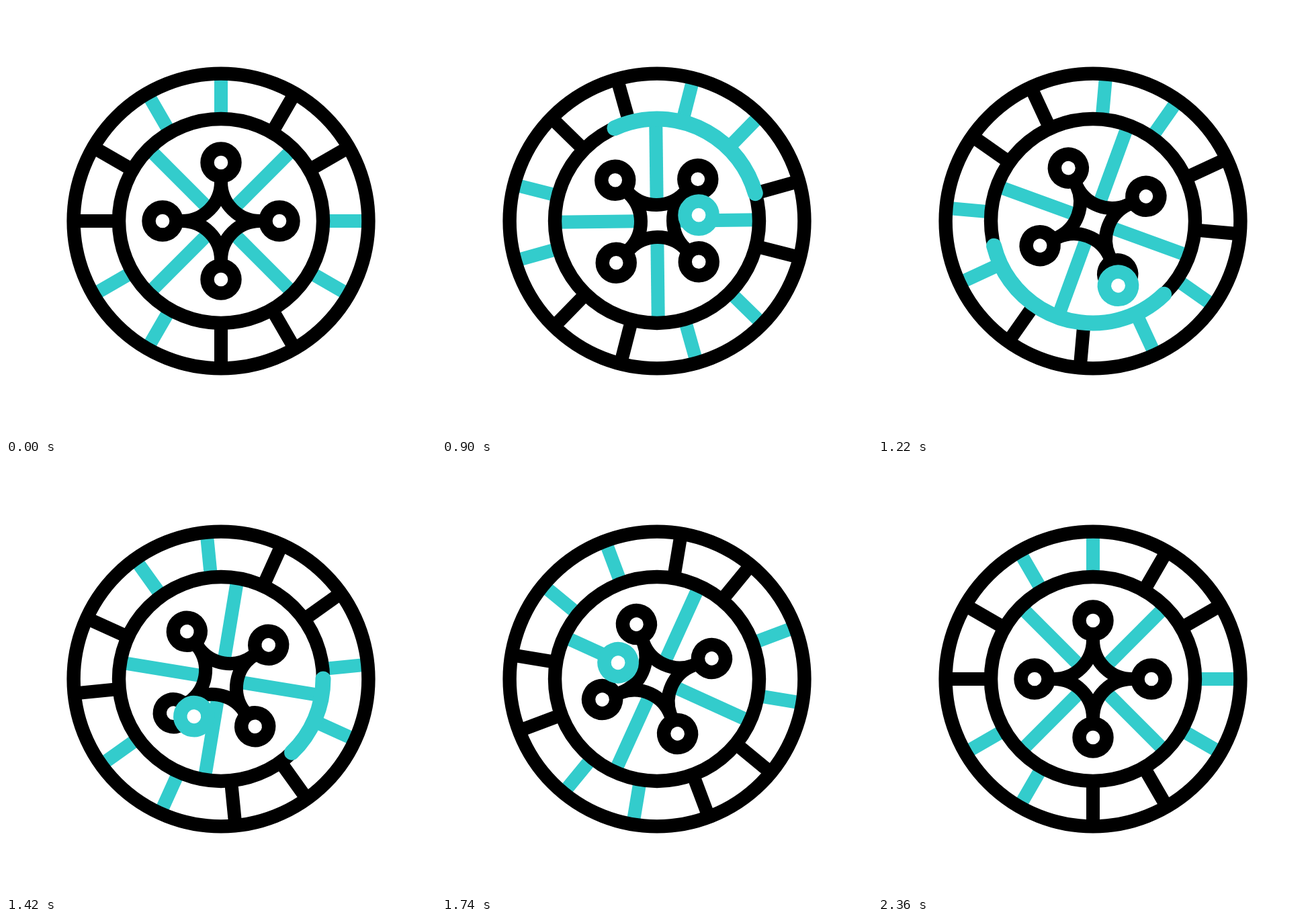
Recreate the animation shown at these times as an HTML page with a canvas. Size 640 px wide and 640 px high, loop 2.4 s.

```html
<!DOCTYPE html>
<html lang="en">
<head>
<meta charset="utf-8">
<title>Roulette wheel</title>
<style>
html, body { margin: 0; height: 100%; overflow: hidden; background: #fff; }
canvas { display: block; }
</style>
</head>
<body>
<canvas id="stage" width="640" height="640"></canvas>
<script>
const ctx = document.getElementById('stage').getContext('2d');
const LOOP = 2400, TAU = Math.PI * 2, RAD = Math.PI / 180;
const BLACK = '#000', TEAL = '#33cccc';

// Ball positions as [time, x, y], in the turning frame of the wheel
const BALL = [
  [80, 15, -269], [580, 72, -66], [900, 38.3, -49.6], [1220, 6.7, -103],
  [1420, -21.8, -65.2], [1740, -45.7, -43.1], [2360, -45.7, -43.1]
];

// Eased progress from 0 to 1 between two times
function ease(t, from, to) {
  const p = Math.min(1, Math.max(0, (t - from) / (to - from)));
  return p * p * (3 - 2 * p);
}

function slope(i, axis) {
  const a = BALL[i - 1], b = BALL[i + 1];
  return a && b ? (b[axis] - a[axis]) / (b[0] - a[0]) : 0;
}

// Smooth curve through the ball positions
function ballAt(t, axis) {
  let i = 0;
  while (i < BALL.length - 2 && t > BALL[i + 1][0]) i++;
  const a = BALL[i], b = BALL[i + 1], span = b[0] - a[0];
  const p = (t - a[0]) / span, q = 1 - p;
  return q * q * (1 + 2 * p) * a[axis] + p * p * (3 - 2 * p) * b[axis] +
    span * p * q * (q * slope(i, axis) - p * slope(i + 1, axis));
}

function stroke(color, width = 20) {
  ctx.strokeStyle = color;
  ctx.lineWidth = width;
  ctx.stroke();
}

function circle(x, y, r, color, fill) {
  ctx.beginPath();
  ctx.arc(x, y, r, 0, TAU);
  if (fill) {
    ctx.fillStyle = fill;
    ctx.fill();
  }
  stroke(color, 20.4);
}

function spoke(angle, from, to, color) {
  const c = Math.cos(angle * RAD), s = Math.sin(angle * RAD);
  ctx.beginPath();
  ctx.moveTo(from * c, from * s);
  ctx.lineTo(to * c, to * s);
  stroke(color);
}

function drawHub() {
  ctx.beginPath();
  ctx.moveTo(0, -58);
  ctx.arc(58, -58, 58, Math.PI, Math.PI / 2, true);
  ctx.arc(58, 58, 58, -Math.PI / 2, -Math.PI, true);
  ctx.arc(-58, 58, 58, 0, -Math.PI / 2, true);
  ctx.arc(-58, -58, 58, Math.PI / 2, 0, true);
  ctx.closePath();
  ctx.fillStyle = '#fff';
  ctx.fill();
  stroke(BLACK);
  for (let a = 0; a < 360; a += 90) {
    spoke(a, 57, 70, BLACK);
    circle(87 * Math.cos(a * RAD), 87 * Math.sin(a * RAD), 20.5, BLACK, '#fff');
  }
}

function drawTrail(t) {
  const head = ease(t, 600, 1400), tail = ease(t, 800, 1600);
  if (head <= tail) return;
  ctx.lineCap = 'round';
  ctx.beginPath();
  ctx.arc(0, 0, 152, -TAU * tail, -TAU * head, true);
  stroke(TEAL, 23);
  ctx.lineCap = 'butt';
}

function drawBall(t) {
  const size = ease(t, 80, 240) - ease(t, 2160, 2360);
  if (size <= 0) return;
  ctx.translate(ballAt(t, 1), ballAt(t, 2));
  ctx.scale(size, size);
  circle(0, 0, 20.6, TEAL, '#fff');
}

function draw(t) {
  // The wheel overshoots a full turn, then settles back
  const turn = 373 * ease(t, 600, 2000) - 13 * ease(t, 2000, 2360);
  ctx.setTransform(1, 0, 0, 1, 320, 320);
  ctx.clearRect(-320, -320, 640, 640);

  ctx.save();
  ctx.rotate(turn * RAD);
  for (let i = 0; i < 12; i++) spoke(i * 30, 152, 218, i % 4 < 2 ? TEAL : BLACK);
  for (let a = 45; a < 360; a += 90) spoke(a, 25, 150, TEAL);
  drawHub();
  ctx.restore();

  circle(0, 0, 219.4, BLACK);
  circle(0, 0, 152, BLACK);
  drawTrail(t);

  ctx.rotate(turn * RAD);
  drawBall(t);
}

function frame() {
  draw(performance.now() % LOOP);
  requestAnimationFrame(frame);
}
frame();
</script>
</body>
</html>
```
